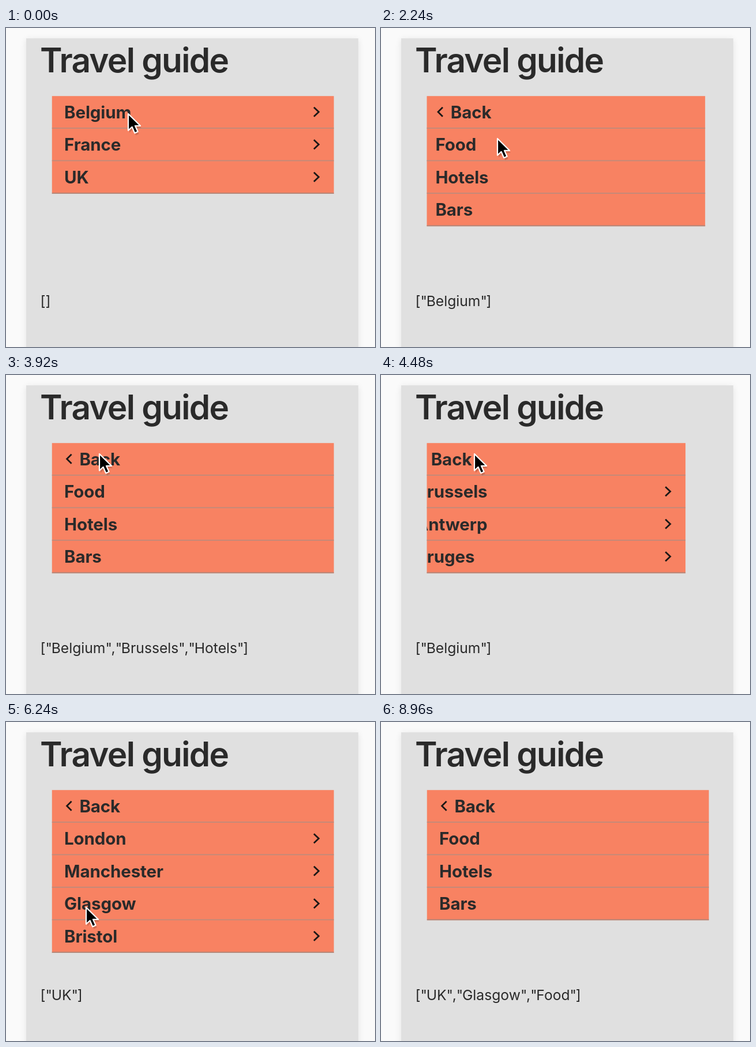
Write an HTML page that moves like this. It is 640 by 554 pixels and loops after 9.52 s.

```html
<!DOCTYPE html>
<html lang="en">
<head>
<meta charset="utf-8">
<title>Travel guide</title>
<style>
  html, body { margin: 0; width: 100%; height: 100%; overflow: hidden; background: #fafafa; }
  svg { display: block; width: 640px; height: 554px; }
  text { font-family: Inter, Roboto, sans-serif; fill: #2a2a2a; white-space: pre; }
  .title { font-size: 58.5px; font-weight: 600; letter-spacing: -1.75px; }
  .item { font-size: 29.5px; font-weight: 700; letter-spacing: -0.1px; }
  .path { font-size: 24.7px; }
  .quote { letter-spacing: -1.4px; }
  .chevron { fill: none; stroke: #1c1816; stroke-width: 2.8; }
</style>
</head>
<body>
<svg viewBox="0 0 640 554">
  <defs>
    <clipPath id="view"><rect x="79.5" y="118" width="489.3" height="300"/></clipPath>
    <filter id="soft" x="-10%" y="-10%" width="120%" height="120%"><feGaussianBlur stdDeviation="6"/></filter>
  </defs>
  <rect width="640" height="554" fill="#fafafa"/>
  <rect x="35" y="20" width="576" height="580" fill="#000" opacity="0.09" filter="url(#soft)"/>
  <rect x="35" y="18" width="576" height="540" fill="#e0e0e0"/>
  <text class="title" x="59" y="76.5">Travel guide</text>
  <g clip-path="url(#view)"><g id="panel"></g></g>
  <text class="path" id="path" x="59.5" y="482.5"></text>
  <g id="cursor">
    <path d="M1 2V31l6.6-6.2 4.6 10.6 5.4-2.4-4.6-10.2h9Z" fill="#000" opacity="0.16" transform="translate(1 2)"/>
    <path d="M0 0V29l6.6-6.2 4.6 10.6 5.4-2.4-4.6-10.2h9Z" fill="#000" stroke="#fff" stroke-width="2.2" stroke-linejoin="round"/>
  </g>
</svg>
<script>
const LOOP = 9520, STEP = 80, HALF = 320, TRAVEL = 560, CURSOR_END = 8960;
const LEFT = 79.5, TOP = 118.2, WIDTH = 489.3, ROW = 56.5;
const $ = id => document.getElementById(id);

// Names ending in ">" open a further level.
const menus = {
  root: ["Belgium>", "France>", "UK>"],
  belgium: ["<Back", "Brussels>", "Antwerp>", "Bruges>"],
  uk: ["<Back", "London>", "Manchester>", "Glasgow>", "Bristol>"],
  city: ["<Back", "Food", "Hotels", "Bars"]
};

// dir: -1 slides onward, 1 slides back, 0 changes only the path
const clicks = [
  { at: 0, menu: "root", path: [], dir: 0 },
  { at: 1152, menu: "belgium", path: ["Belgium"], dir: -1 },
  { at: 2192, menu: "city", path: ["Belgium", "Brussels"], dir: -1 },
  { at: 3440, menu: "city", path: ["Belgium", "Brussels", "Hotels"], dir: 0 },
  { at: 3928, menu: "belgium", path: ["Belgium"], dir: 1 },
  { at: 4560, menu: "root", path: [], dir: 1 },
  { at: 5392, menu: "uk", path: ["UK"], dir: -1 },
  { at: 6280, menu: "city", path: ["UK", "Glasgow"], dir: -1 },
  { at: 7760, menu: "city", path: ["UK", "Glasgow", "Food"], dir: 0 }
];

// The pointer rests at each stop and reaches the next one at its time.
const stops = [
  { at: 0, x: 212, y: 149 },
  { at: 2240, x: 202, y: 192 },
  { at: 3280, x: 162, y: 253 },
  { at: 3920, x: 162, y: 137 },
  { at: 5200, x: 124.5, y: 262 },
  { at: 6240, x: 139, y: 322 },
  { at: 6960, x: 143.5, y: 254 },
  { at: 7920, x: 171, y: 203 }
];

const easeInOut = x => x < 0.5 ? 4 * x ** 3 : 1 - (2 - 2 * x) ** 3 / 2;
const smooth = x => x * x * (3 - 2 * x);
const mix = (a, b, p) => a + (b - a) * p;

function drawMenu(items) {
  const bar = (y, h, fill) => `<rect x="${LEFT}" y="${y}" width="${WIDTH}" height="${h}" fill="${fill}"/>`;
  let out = bar(TOP, items.length * ROW, "#f88262");
  items.forEach((item, i) => {
    const y = TOP + i * ROW, mid = y + 27.6;
    const back = item.startsWith("<"), last = i === items.length - 1;
    out += bar(y + ROW - 1.7, 1.8, last ? "#b08578" : "#c08b7a");
    out += `<text class="item" x="${back ? 127.4 : 101}" y="${y + 38.5}">${item.replace(/[<>]/, "")}</text>`;
    if (back) out += `<path class="chevron" d="M113.6 ${mid - 8}l-8 8 8 8"/>`;
    if (item.endsWith(">")) out += `<path class="chevron" d="M534 ${mid - 8}l8.4 8-8.4 8"/>`;
  });
  return out;
}

function slideOffset(click, age) {
  if (!click.dir || age >= 2 * HALF) return 0;
  const p = easeInOut((age % HALF) / HALF);
  return click.dir * WIDTH * (age < HALF ? p : p - 1);
}

function cursorAt(t) {
  const n = stops.findLastIndex(s => s.at <= t);
  const from = stops[n], to = stops[n + 1] || from;
  const p = smooth(Math.max(0, 1 - (to.at - t) / TRAVEL));
  return to === from ? [from.x, from.y] : [mix(from.x, to.x, p), mix(from.y, to.y, p)];
}

let shown = "";
function render(t) {
  const n = clicks.findLastIndex(c => c.at <= t);
  const click = clicks[n], age = t - click.at;
  if (shown !== click.menu) {
    shown = click.menu;
    $("panel").innerHTML = drawMenu(menus[shown]);
  }
  $("panel").setAttribute("transform", `translate(${slideOffset(click, age).toFixed(2)} 0)`);

  // The path is updated once the panel has left the view.
  const pending = click.dir && age < HALF;
  const path = JSON.stringify(clicks[pending ? n - 1 : n].path);
  $("path").innerHTML = path.replace(/"/g, '<tspan class="quote">"</tspan>');

  const [x, y] = cursorAt(t);
  $("cursor").setAttribute("transform", `translate(${x.toFixed(2)} ${y.toFixed(2)})`);
  $("cursor").setAttribute("visibility", t < CURSOR_END ? "visible" : "hidden");
}

const start = performance.now();
function tick(now) {
  const t = Math.max(0, now - start) % LOOP;
  render(Math.floor(t / STEP) * STEP);
  requestAnimationFrame(tick);
}
render(0);
requestAnimationFrame(tick);
</script>
</body>
</html>
```
